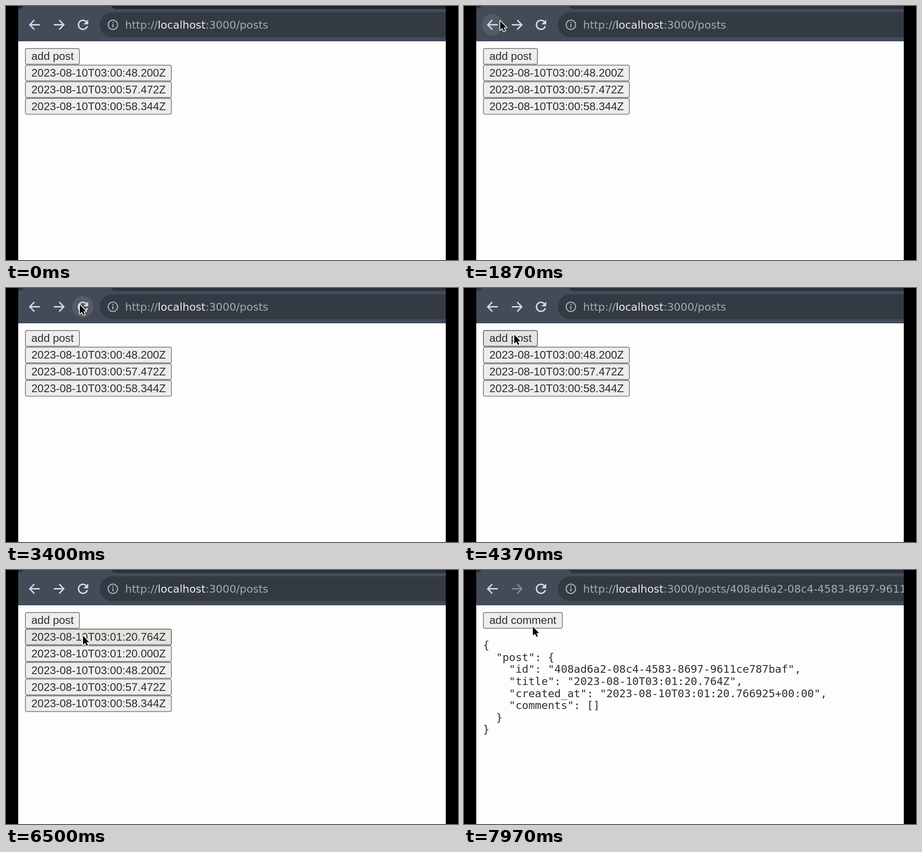
Animation of 998x561 px, one loop 8000 ms. Source, as an HTML page with a canvas:

```html
<!DOCTYPE html>
<html lang="en">
<head>
<meta charset="utf-8">
<title>Posts</title>
<style>
  html, body { margin: 0; width: 100%; height: 100%; overflow: hidden; background: #000; }
  canvas { display: block; width: 998px; height: 561px; }
</style>
</head>
<body>
<canvas id="stage" width="998" height="561"></canvas>
<script>
const ctx = document.getElementById('stage').getContext('2d');
const LOOP = 8000, LEFT = 27, RIGHT = 971;
const SANS = '24.4px "Liberation Sans", Arial, sans-serif';
const MONO = '23.8px "DejaVu Sans Mono", monospace';
const UI = '23.5px "DejaVu Sans", sans-serif';
const ICON = '#d4d9e4', FADED = '#868b96', MUTED = '#a5abb5';

const FOCUS = 1000, FIRST_POST = 4730, SECOND_POST = 5500, OPEN_POST = 6570;
const ID = '408ad6a2-08c4-4583-8697-9611ce787baf';
const OLD_POSTS = ['00:48.200', '00:57.472', '00:58.344'];
const JSON_TEXT = JSON.stringify({
  post: {
    id: ID,
    title: '2023-08-10T03:01:20.764Z',
    created_at: '2023-08-10T03:01:20.766925+00:00',
    comments: []
  }
}, null, 2).split('\n');

// Pointer stops: time, x, y
const PATH = [
  [1300, 330, 575], [1780, 80, 33], [1900, 80, 33], [2340, 163, 37],
  [3640, 163, 37], [4250, 111, 103], [5720, 111, 103], [6150, 170, 145],
  [7250, 170, 145], [7930, 152, 125], [8000, 152, 125]
];

function pointerAt(t) {
  if (t < PATH[0][0]) return null;
  const i = PATH.findIndex(p => p[0] > t);
  const [t0, x0, y0] = PATH[i - 1], [t1, x1, y1] = PATH[i];
  const u = (t - t0) / (t1 - t0), e = u * u * (3 - 2 * u);
  return { x: x0 + (x1 - x0) * e, y: y0 + (y1 - y0) * e };
}

function text(str, x, y, font, color) {
  ctx.font = font;
  ctx.fillStyle = color;
  ctx.fillText(str, x, y);
  return x + ctx.measureText(str).width;
}

function shape(points, close) {
  ctx.beginPath();
  points.forEach(([x, y]) => ctx.lineTo(x, y));
  if (close) ctx.closePath();
}

function disc(x, y, r, color) {
  ctx.beginPath();
  ctx.arc(x, y, r, 0, Math.PI * 2);
  ctx.fillStyle = color;
  ctx.fill();
}

function button(label, y, w, p) {
  const hot = p && p.x > 42 && p.x < 42 + w && p.y > y && p.y < y + 36;
  ctx.beginPath();
  ctx.roundRect(42.8, y + 0.8, w - 1.6, 34.8, 3.5);
  ctx.fillStyle = hot ? '#e4e4df' : '#ededed';
  ctx.fill();
  ctx.lineWidth = 1.7;
  ctx.strokeStyle = hot ? '#5c5c66' : '#777780';
  ctx.stroke();
  text(label, 56, y + 26.3, SANS, '#2c2c2e');
}

function arrow(x, dir, color) {
  ctx.strokeStyle = color;
  ctx.lineWidth = 3.1;
  shape([[x - 11 * dir, 41.5], [x + 10.5 * dir, 41.5]]);
  ctx.stroke();
  shape([[x + dir, 31], [x + 11 * dir, 41.5], [x + dir, 52]]);
  ctx.stroke();
}

function reloadIcon() {
  ctx.strokeStyle = ICON;
  ctx.lineWidth = 3.1;
  ctx.beginPath();
  ctx.arc(170, 41.5, 10, 0.3, -0.75, false);
  ctx.stroke();
  shape([[181.5, 30], [181.5, 40.5], [171, 40.5]], true);
  ctx.fillStyle = ICON;
  ctx.fill();
}

function infoIcon() {
  ctx.strokeStyle = MUTED;
  ctx.lineWidth = 2.4;
  ctx.beginPath();
  ctx.arc(236, 41.5, 10.4, 0, Math.PI * 2);
  ctx.stroke();
  ctx.fillStyle = MUTED;
  ctx.fillRect(234.7, 35.2, 2.7, 2.7);
  ctx.fillRect(234.7, 40, 2.7, 7.2);
}

function toolbar(t, p) {
  const open = t >= OPEN_POST;
  ctx.fillStyle = '#434b58';
  ctx.fillRect(LEFT, 0, RIGHT - LEFT, 78);

  // Tab strip on both sides of the active tab
  ctx.fillStyle = t < FOCUS ? '#1f252e' : '#2e323d';
  ctx.beginPath();
  ctx.moveTo(LEFT, 0);
  ctx.lineTo(39, 0);
  ctx.quadraticCurveTo(37, 5, 27, 6.5);
  ctx.moveTo(232, 0);
  ctx.quadraticCurveTo(234, 5, 241, 6.5);
  ctx.lineTo(RIGHT, 6.5);
  ctx.lineTo(RIGHT, 0);
  ctx.fill();

  ctx.beginPath();
  ctx.roundRect(207, 14, 840, 55, 27.5);
  ctx.fillStyle = '#343a43';
  ctx.fill();

  if (p) {
    for (const x of [63, 116.5, 169.5]) {
      if (Math.hypot(p.x - x, p.y - 41.5) < 23.5) disc(x, 41.5, 23.5, '#545b67');
    }
  }
  arrow(63.5, -1, ICON);
  arrow(116.5, 1, open ? FADED : ICON);
  reloadIcon();
  infoIcon();

  let x = text('http://', 263, 50, UI, MUTED);
  x = text('localhost', x, 50, UI, '#e9ecf1');
  text(':3000/posts' + (open ? '/' + ID : ''), x, 50, UI, MUTED);
}

function page(t, p) {
  ctx.fillStyle = '#fdfdfc';
  ctx.fillRect(LEFT, 78, RIGHT - LEFT, 483);
  if (t >= OPEN_POST) {
    button('add comment', 93, 176, null);
    JSON_TEXT.forEach((line, i) => text(line, 42, 174.2 + i * 26.6, MONO, '#303032'));
    return;
  }
  const posts = [...OLD_POSTS];
  if (t >= FIRST_POST) posts.unshift('01:20.000');
  if (t >= SECOND_POST) posts.unshift('01:20.764');
  button('add post', 93, 121, p);
  posts.forEach((s, i) => button(`2023-08-10T03:${s}Z`, 129.8 + i * 36.8, 324, p));
}

function pointer({ x, y }) {
  ctx.save();
  ctx.translate(x, y);
  shape([[0, 0], [0, 19.8], [4.6, 15.8], [7.8, 22.8], [11, 21.3], [7.9, 14.5], [13.8, 14.5]], true);
  ctx.lineJoin = 'round';
  ctx.lineWidth = 3.2;
  ctx.strokeStyle = '#fff';
  ctx.stroke();
  ctx.fillStyle = '#080808';
  ctx.fill();
  ctx.restore();
}

function draw(t) {
  const p = pointerAt(t);
  ctx.fillStyle = '#000';
  ctx.fillRect(0, 0, 998, 561);
  ctx.save();
  ctx.beginPath();
  ctx.rect(LEFT, 0, RIGHT - LEFT, 561);
  ctx.clip();
  toolbar(t, p);
  page(t, p);
  if (p) pointer(p);
  ctx.restore();
}

const start = performance.now();
function tick() {
  draw((performance.now() - start) % LOOP);
  requestAnimationFrame(tick);
}
tick();
</script>
</body>
</html>
```
